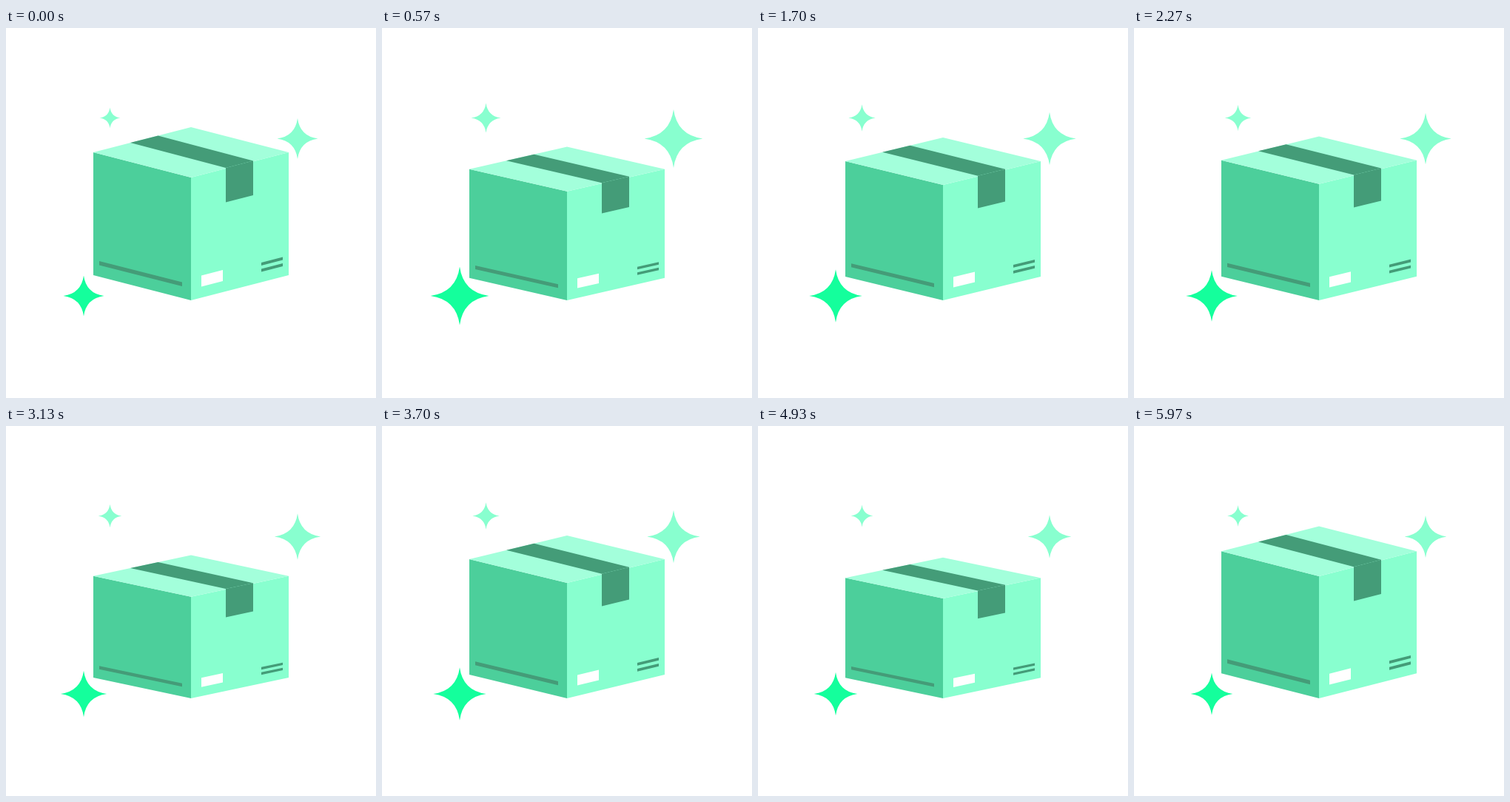
Animation of 500x500 px, one loop 6 s. Source, as an HTML page:

```html
<!DOCTYPE html>
<html lang="en">
<head>
<meta charset="utf-8">
<title>Box and sparkles</title>
<style>
  html, body { margin: 0; width: 100%; height: 100%; overflow: hidden; background: #fff; }
  svg { display: block; width: 100vw; height: 100vh; }
</style>
</head>
<body>
<svg viewBox="0 0 500 500">
  <defs>
    <path id="star" d="M0-1Q.12-.12 1 0Q.12 .12 0 1Q-.12 .12-1 0Q-.12-.12 0-1Z"/>
  </defs>
  <!-- The box stands on y = 0, so it squashes towards its lowest corner -->
  <g id="box">
    <path fill="#4ccf9b" d="M118-200L250-166V0L118-34Z"/>
    <path fill="#88ffcf" d="M250-166L382-200V-34L250 0Z"/>
    <path fill="#a3ffdb" d="M250-234L382-200L250-166L118-200Z"/>
    <g fill="#449c78">
      <path d="M168-213L205.500-222.500L334-188.500L297-179Z"/>
      <path d="M297-179L334-188.500V-142L297-132.500Z"/>
      <path d="M126-53L238-24.500V-19L126-47.500Z"/>
      <path d="M345-51L374-58.500V-54.500L345-47Z"/>
      <path d="M345-42.500L374-50V-46L345-38.500Z"/>
    </g>
    <path fill="#fff" d="M264-33.500L293-41V-26L264-18.500Z"/>
  </g>
  <use class="star" href="#star" fill="#88ffcf" data-x="140.500" data-y="121.500" data-r="14"/>
  <use class="star" href="#star" fill="#88ffcf" data-x="394" data-y="149.500" data-r="27.500"/>
  <use class="star" href="#star" fill="#14ff9c" data-x="105" data-y="362" data-r="27.500"/>
</svg>
<script>
  const LOOP = 6000, FPS = 30;
  const box = document.getElementById('box');
  const stars = document.querySelectorAll('.star');

  // Linear swing 0 -> 1 -> 0 over one period
  const swing = (t, period) => 1 - Math.abs(1 - 2 * (t % period) / period);

  function draw(now) {
    const step = Math.floor((now % LOOP + 3.4) * FPS / 1000);
    const t = step * 1000 / FPS;
    box.setAttribute('transform', `translate(0 368) scale(1 ${1 - 0.2 * swing(t, 2000)})`);
    for (const star of stars) {
      const { x, y, r } = star.dataset;
      const size = r * (1 + 0.5 * swing(t, 1000));
      star.setAttribute('transform', `translate(${x} ${y}) scale(${size})`);
    }
  }

  const start = performance.now();
  function tick() {
    draw(performance.now() - start);
    requestAnimationFrame(tick);
  }
  tick();
</script>
</body>
</html>
```
